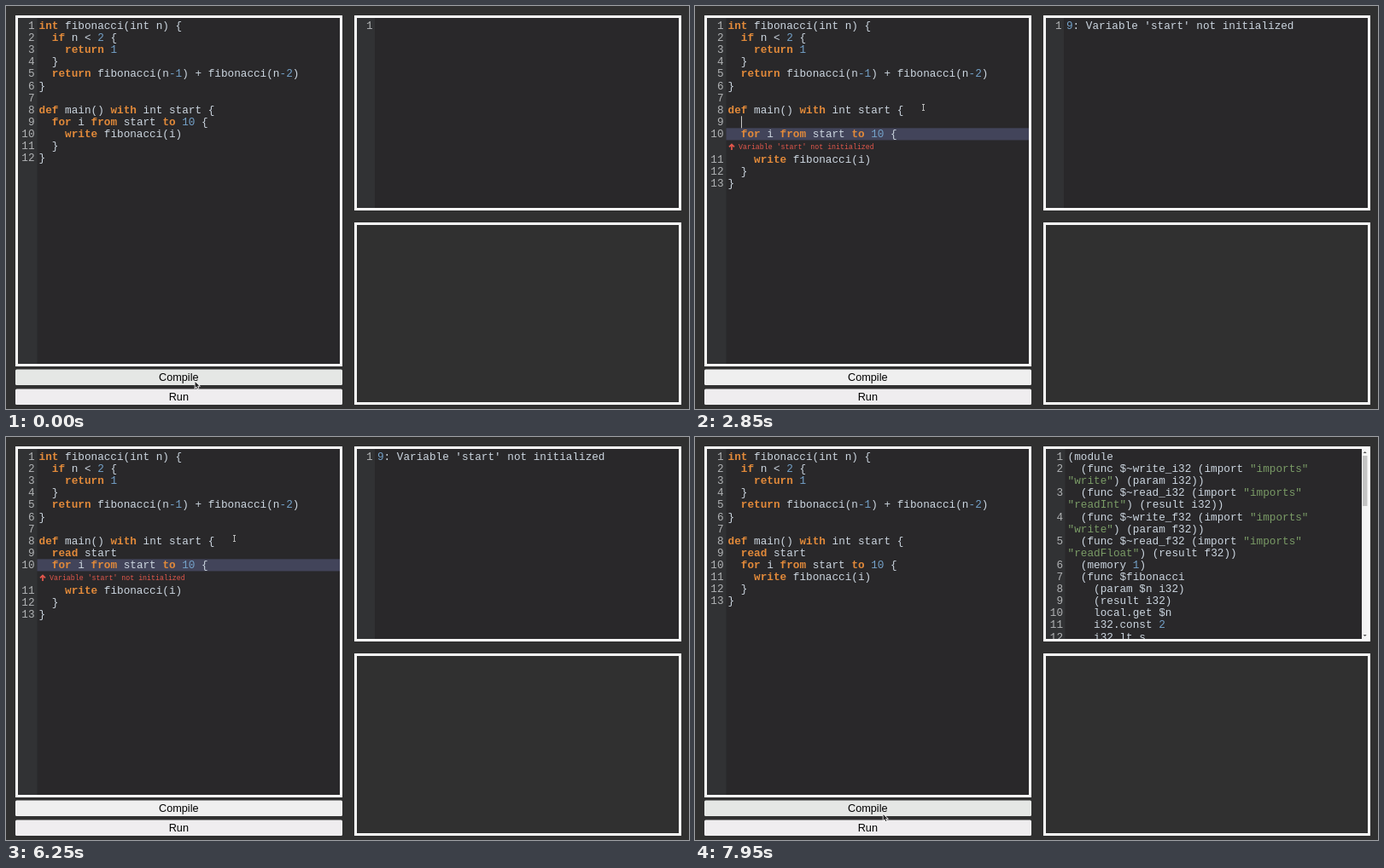
Write an HTML page with a canvas that moves like this. It is 800 px wide and 473 px high and loops after 8 s.

```html
<!DOCTYPE html>
<html lang="en">
<head>
<meta charset="utf-8">
<title>Code editor</title>
<style>
html, body { margin: 0; width: 100%; height: 100%; overflow: hidden; background: #303030; }
canvas { display: block; }
</style>
</head>
<body>
<canvas id="stage" width="800" height="473"></canvas>
<script>
const ctx = document.getElementById('stage').getContext('2d');
const LOOP = 8000;
const MONO = '"Liberation Mono", monospace';
const SANS = '"Liberation Sans", Arial, sans-serif';
const SIZE = 12.7, CHAR = 7.62, ROW = 14.1, TOP = 16.4, BASE = 27, WIDGET = 16;
const COLOR = {
  page: '#303030', panel: '#29282a', gutter: '#313234', frame: '#fbfbfb',
  text: '#ccd6e0', lineNo: '#b0b2b4', keyword: '#e28a3a', number: '#74a1c8',
  string: '#7a9b66', mark: '#42445a', error: '#e2574c'
};
const MESSAGE = "Variable 'start' not initialized";

// Moments of the session, in ms
const PRESS_1 = 100, RELEASE_1 = 250, FAIL = 450;
const CLICK = 2400, ENTER = 2800;
const PRESS_2 = 7500, RELEASE_2 = 7700, SUCCESS = 7750;
const TYPED = 'read start';
const KEYS = [3250, 3450, 3650, 3850, 4000, 4150, 4300, 4400, 4500, 4650];

const PROGRAM = [
  'int fibonacci(int n) {',
  '  if n < 2 {',
  '    return 1',
  '  }',
  '  return fibonacci(n-1) + fibonacci(n-2)',
  '}',
  '',
  'def main() with int start {',
  '  for i from start to 10 {',
  '    write fibonacci(i)',
  '  }',
  '}'
];

// Each entry is one numbered line, split where it wraps
const OUTPUT = [
  ['(module'],
  ['  (func $~write_i32 (import "imports"', '"write") (param i32))'],
  ['  (func $~read_i32 (import "imports"', '"readInt") (result i32))'],
  ['  (func $~write_f32 (import "imports"', '"write") (param f32))'],
  ['  (func $~read_f32 (import "imports"', '"readFloat") (result f32))'],
  ['  (memory 1)'],
  ['  (func $fibonacci'],
  ['    (param $n i32)'],
  ['    (result i32)'],
  ['    local.get $n'],
  ['    i32.const 2'],
  ['    i32.lt_s']
];

const CODE_TOKENS = /^int\b|\b(?:if|return|def|with|for|from|to|write|read)\b|-?\b\d+/g;
const OUTPUT_TOKENS = /"[^"]*"|\b\d+\b/g;

function rect(x, y, w, h, color) {
  ctx.fillStyle = color;
  ctx.fillRect(x, y, w, h);
}

function label(str, x, y, color, font, align = 'left') {
  ctx.font = font;
  ctx.textAlign = align;
  ctx.fillStyle = color;
  ctx.fillText(str, x, y);
}

function panel(x, y, w, h, gutter) {
  rect(x, y, w, h, COLOR.frame);
  rect(x + 3, y + 3, w - 6, h - 6, gutter ? COLOR.panel : COLOR.page);
  if (gutter) rect(x + 3, y + 3, gutter, h - 6, COLOR.gutter);
}

function codeLine(str, x, y, tokens) {
  const put = (part, at, color, bold = '') => {
    if (part.trim()) label(part, x + at * CHAR, y, color, `${bold} ${SIZE}px ${MONO}`);
  };
  let end = 0;
  for (const match of str.matchAll(tokens)) {
    const word = match[0];
    put(str.slice(end, match.index), end, COLOR.text);
    if (word[0] === '"') put(word, match.index, COLOR.string);
    else if (/\d/.test(word)) put(word, match.index, COLOR.number);
    else put(word, match.index, COLOR.keyword, 'bold');
    end = match.index + word.length;
  }
  put(str.slice(end), end, COLOR.text);
}

function lineNumber(n, right, y) {
  label(n, right, y, COLOR.lineNo, `${SIZE}px ${MONO}`, 'right');
}

function errorWidget(top) {
  ctx.strokeStyle = COLOR.error;
  ctx.lineWidth = 1.7;
  ctx.beginPath();
  ctx.moveTo(43, top + 11.5);
  ctx.lineTo(43, top + 5);
  ctx.moveTo(40, top + 8);
  ctx.lineTo(43, top + 5);
  ctx.lineTo(46, top + 8);
  ctx.stroke();
  label(MESSAGE, 51, top + 10.5, COLOR.error, `8.28px ${MONO}`);
}

function caret(t, typed) {
  if (t < CLICK || t >= PRESS_2) return;
  const last = KEYS.filter(k => k <= t).pop() || (t >= ENTER ? ENTER : CLICK);
  if (Math.floor((t - last) / 530) % 2) return;
  const col = t < ENTER ? PROGRAM[7].length : 2 + typed.length;
  const row = t < ENTER ? 7 : 8;
  rect(Math.round(38.6 + col * CHAR), TOP + row * ROW, 1, ROW, '#c8c8c8');
}

function editor(t) {
  panel(11, 11, 383, 412, 22.5);
  const lines = PROGRAM.slice();
  const typed = TYPED.slice(0, KEYS.filter(k => k <= t).length);
  if (t >= ENTER) lines.splice(8, 0, '  ' + typed);
  const failed = t >= FAIL && t < SUCCESS;
  const bad = t >= ENTER ? 9 : 8;
  if (failed) {
    const top = TOP + bad * ROW;
    rect(36.5, top, 354.5, ROW, COLOR.mark);
    errorWidget(top + ROW);
  }
  lines.forEach((line, i) => {
    const y = BASE + i * ROW + (failed && i > bad ? WIDGET : 0);
    lineNumber(i + 1, 33.6, y);
    codeLine(line, 38.6, y, CODE_TOKENS);
  });
  caret(t, typed);
}

function triangle(x, y, dir) {
  ctx.fillStyle = '#505050';
  ctx.beginPath();
  ctx.moveTo(x - 2, y + dir);
  ctx.lineTo(x + 2, y + dir);
  ctx.lineTo(x, y - dir);
  ctx.fill();
}

function scrollbar() {
  rect(781, 14, 7, 223, '#f4f4f4');
  rect(782, 22, 5.5, 59, '#c3c3c3');
  triangle(784.7, 18, 1);
  triangle(784.7, 233, -1);
}

function output(t) {
  const lines = t >= SUCCESS ? OUTPUT : [[t >= FAIL ? '9: ' + MESSAGE : '']];
  // Two-digit line numbers widen the gutter
  const widen = lines.length > 9 ? 1.6 : 0;
  panel(408, 11, 383, 229, 21 + widen);
  ctx.save();
  ctx.beginPath();
  ctx.rect(411, 14, 377, 223);
  ctx.clip();
  let y = BASE;
  lines.forEach((rows, i) => {
    lineNumber(i + 1, 429.5 + widen, y);
    for (const row of rows) {
      codeLine(row, 435 + widen, y, OUTPUT_TOKENS);
      y += ROW;
    }
  });
  ctx.restore();
  if (t >= SUCCESS) scrollbar();
}

function button(text, y, color) {
  ctx.fillStyle = color;
  ctx.beginPath();
  ctx.roundRect(11, y, 383, 18.4, 1.5);
  ctx.fill();
  label(text, 202.3, y + 13.5, '#000', `${SIZE}px ${SANS}`, 'center');
}

const between = (t, a, b) => t >= a && t < b;

function glide(t, start, end, from, bend, to) {
  const p = Math.min(1, Math.max(0, (t - start) / (end - start)));
  const e = p * p * (3 - 2 * p);
  return from.map((v, i) =>
    (1 - e) ** 2 * v + 2 * e * (1 - e) * bend[i] + e * e * to[i]);
}

function pointerAt(t) {
  const rest = [267.5, 119];
  return t < 4000
    ? glide(t, 1050, 1900, [221, 440.5], [225, 190], rest)
    : glide(t, 6450, 7250, rest, [285, 320], [220, 442.5]);
}

function pointer(x, y) {
  ctx.save();
  ctx.translate(x, y);
  if (y < 420) {
    ctx.lineWidth = 1;
    ctx.strokeStyle = '#b9b9b9';
    ctx.beginPath();
    ctx.moveTo(-1.5, -3.5);
    ctx.lineTo(1.5, -3.5);
    ctx.moveTo(0, -3.5);
    ctx.lineTo(0, 3.5);
    ctx.moveTo(-1.5, 3.5);
    ctx.lineTo(1.5, 3.5);
    ctx.stroke();
  } else {
    ctx.beginPath();
    [[0.5, 0.5], [0.5, 7.5], [2.1, 6], [3.3, 8.4], [4.4, 7.9], [3.3, 5.5], [5.4, 5.3]]
      .forEach(p => ctx.lineTo(...p));
    ctx.closePath();
    ctx.lineWidth = 1.5;
    ctx.strokeStyle = '#fff';
    ctx.fillStyle = '#262626';
    ctx.stroke();
    ctx.fill();
  }
  ctx.restore();
}

function draw(t) {
  rect(0, 0, 800, 473, COLOR.page);
  editor(t);
  output(t);
  panel(408, 254, 383, 214, 0);
  const [x, y] = pointerAt(t);
  const pressed = between(t, PRESS_1, RELEASE_1) || between(t, PRESS_2, RELEASE_2);
  const hover = between(y, 426.6, 445);
  button('Compile', 426.6, pressed ? '#f5f5f5' : hover ? '#e5e7e5' : '#efefef');
  button('Run', 449.5, '#efedef');
  pointer(x, y);
}

function frame() {
  draw(performance.now() % LOOP);
  requestAnimationFrame(frame);
}
frame();
</script>
</body>
</html>
```
